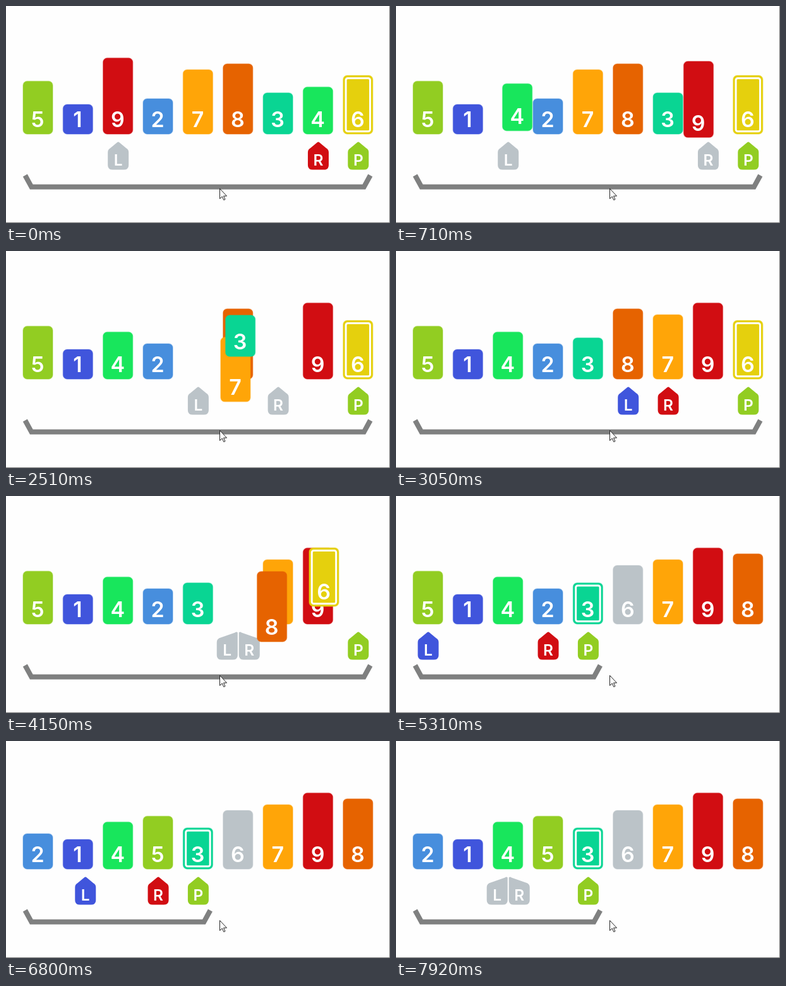
Animation, 608 px wide and 344 px high, one loop 8 s. Source, as an HTML page:

```html
<!DOCTYPE html>
<html lang="en">
<head>
<meta charset="utf-8">
<title>Quicksort</title>
<style>
  html, body { margin: 0; width: 100%; height: 100%; overflow: hidden; background: #fefefe; }
  svg { display: block; width: 608px; height: 344px; }
  text { font-family: Inter, "Noto Sans CJK JP", sans-serif; font-weight: 600; fill: #fff; text-anchor: middle; }
</style>
</head>
<body>
<svg viewBox="0 0 608 344">
  <path id="bracket" fill="none" stroke="#7f8080" stroke-width="8"/>
  <g id="markers"></g>
  <g id="bars"></g>
  <path id="cursor" d="M.5 .5V16.5L4.2 13L6.8 18.6L9 17.6L6.5 12.2H11.5Z" fill="#fff" stroke="#222"/>
  <path d="M0 343.5H608M607.5 0V344" stroke="#777" fill="none"/>
</svg>
<script>
const LOOP = 8000, PITCH = 63.35, BASE = 203, WIDTH = 47, ARC = 36;
const GRAY = '#bbc3c8';
const COLORS = ['#4055dc', '#478edd', '#09d593', '#18e65c', '#92cd22', '#e5d00d', '#ffa508', '#e66300', '#d10d12'];
const VALUES = [5, 1, 9, 2, 7, 8, 3, 4, 6];

// Durations of the sorting steps; the sort is under way when the loop begins.
const SWAP = 435, MOVE = 250, CHECK = 320, GAP = 49, REST = 285, RESET = 598;
const SORT_START = -863;

const byId = id => document.getElementById(id);

function add(parent, tag, attrs) {
  const el = document.createElementNS('http://www.w3.org/2000/svg', tag);
  set(el, attrs);
  return parent.appendChild(el);
}

function set(el, attrs) {
  for (const key in attrs) el.setAttribute(key, attrs[key]);
}

function ease(x) {
  x = Math.min(1, Math.max(0, x));
  return x < .5 ? 4 * x ** 3 : 1 - 4 * (1 - x) ** 3;
}

const valueAt = (track, t) =>
  track.reduce((v, { start, time, to }) => v + (to - v) * ease((t - start) / time), 0);

// Runs the sort once and writes down when everything happens.
function planSort() {
  const plan = { left: [], right: [], pivot: [], pair: [], leftStop: [], rightStop: [], swaps: [], sorted: [] };
  const list = [...VALUES];
  let now = SORT_START;

  const put = (name, to, time = 1) => plan[name].push({ start: now, time, to });
  const move = (name, to) => { put(name, to, MOVE); now += MOVE; };
  const stop = name => { now += CHECK; put(name, 1); now += GAP; };
  const swap = (a, b) => {
    plan.swaps.push({ start: now, a, b });
    [list[a], list[b]] = [list[b], list[a]];
    now += SWAP;
    put('leftStop', 0);
    put('rightStop', 0);
  };

  function partition(lo, hi) {
    const pivot = list[hi];
    let l = lo, r = hi - 1;
    while (true) {
      while (l < r && list[l] < pivot) move('left', ++l);
      stop('leftStop');
      while (r > l && list[r] >= pivot) {
        if (--r === l) put('pair', 1, MOVE);
        move('right', r);
      }
      stop('rightStop');
      if (l === r) break;
      swap(l, r);
    }
    swap(l, hi);
    now += REST;
    plan.sorted.push({ start: now, value: pivot });
    return l;
  }

  function reset(lo, hi, time) {
    put('left', lo, time);
    put('right', hi - 1, time);
    put('pivot', hi, time);
    put('pair', 0, time);
  }

  reset(0, list.length - 1, 1);
  const middle = partition(0, list.length - 1);
  reset(0, middle - 1, RESET);
  now += RESET;
  partition(0, middle - 1);
  return plan;
}

const plan = planSort();

const bars = COLORS.map((color, i) => {
  const height = 46.9 + 9.2 * i, y = BASE - height;
  const g = add(byId('bars'), 'g', {});
  const body = add(g, 'rect', { y, width: WIDTH, height, rx: 6.5, 'stroke-opacity': .4, 'stroke-width': 1.4 });
  const frame = add(g, 'rect', {
    x: 4.3, y: y + 4.3, width: WIDTH - 8.6, height: height - 8.6,
    rx: 3, fill: 'none', stroke: '#fff', 'stroke-width': 3
  });
  add(g, 'text', { x: WIDTH / 2 - .4, y: 192.3, 'font-size': 34 }).textContent = i + 1;
  return { g, body, frame };
});

const [left, right, pivot] = ['L', 'R', 'P'].map(letter => {
  const g = add(byId('markers'), 'g', {});
  const shape = add(g, 'path', {});
  add(g, 'text', { y: 252.7, 'font-size': 24.5 }).textContent = letter;
  return { g, shape };
});

// side leans the tip and shifts the marker when two share a slot
function placeMarker({ g, shape }, slot, color, side = 0) {
  const tip = side * -14.5;
  const from = Math.min(-12.5, tip - 2), to = Math.max(12.5, tip + 2);
  set(g, { transform: `translate(${51 + slot * PITCH + side * 17.5} 0)` });
  set(shape, {
    fill: color,
    d: `M-16.5 232Q-16.5 227.5 ${from} 225.3L${tip - 2} 216.5Q${tip} 214.5 ${tip + 2} 216.5` +
       `L${to} 225.3Q16.5 227.5 16.5 232V252Q16.5 259.6 9 259.6H-9Q-16.5 259.6 -16.5 252Z`
  });
}

function placeBar(value, slot, dy = 0) {
  set(bars[value - 1].g, { transform: `translate(${27 + slot * PITCH} ${dy})` });
}

function drawBars(t) {
  const order = [...VALUES];
  let moving = null;
  for (const { start, a, b } of plan.swaps) {
    const p = ease((t - start) / SWAP);
    if (p === 1) [order[a], order[b]] = [order[b], order[a]];
    else if (p > 0) moving = { a, b, p };
  }
  order.forEach((value, slot) => placeBar(value, slot));
  if (moving) {
    const { a, b, p } = moving, dy = ARC * Math.sin(Math.PI * p);
    placeBar(order[a], a + (b - a) * p, dy);
    placeBar(order[b], b + (a - b) * p, -dy);
    for (const slot of [a, b]) byId('bars').append(bars[order[slot] - 1].g);
  }
  const done = plan.sorted.filter(s => t >= s.start).map(s => s.value);
  const chosen = plan.sorted.find(s => t < s.start)?.value;
  bars.forEach(({ body, frame }, i) => {
    const color = done.includes(i + 1) ? GRAY : COLORS[i];
    set(body, { fill: color, stroke: color });
    set(frame, { visibility: i + 1 === chosen ? 'visible' : 'hidden' });
  });
}

function draw(t) {
  const at = name => valueAt(plan[name], t);
  const end = 70 + at('pivot') * PITCH;
  drawBars(t);
  placeMarker(left, at('left'), at('leftStop') > .5 ? GRAY : COLORS[0], -at('pair'));
  placeMarker(right, at('right'), at('rightStop') > .5 ? GRAY : COLORS[8], at('pair'));
  placeMarker(pivot, at('pivot'), COLORS[4]);
  set(byId('bracket'), { d: `M30.3 268.5L40.3 286.8H${end - 10}L${end} 268.5` });
  set(byId('cursor'), { transform: `translate(338 ${t < 820 ? 289 : 284})` });
}

const origin = performance.now();
function tick() {
  draw((performance.now() - origin) % LOOP);
  requestAnimationFrame(tick);
}
tick();
</script>
</body>
</html>
```
